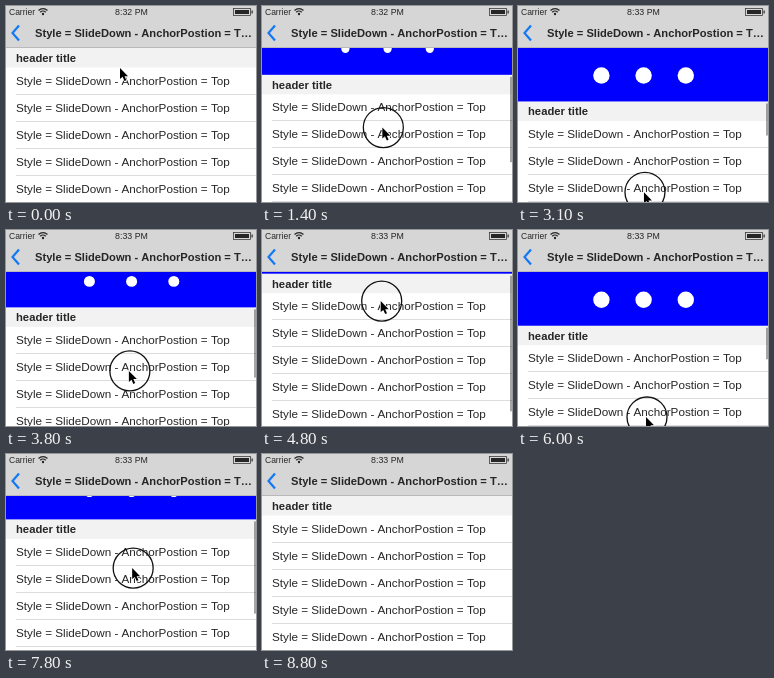
Recreate the animation shown at these times as an HTML page with a canvas. Size 250 px wide and 196 px high, loop 8.9 s.

```html
<!DOCTYPE html>
<html lang="en">
<head>
<meta charset="utf-8">
<title>Pull-down menu</title>
<style>
  html, body { margin: 0; width: 100%; height: 100%; overflow: hidden; background: #fff; }
  canvas { display: block; width: 250px; height: 196px; }
</style>
</head>
<body>
<canvas id="stage" width="250" height="196"></canvas>
<script>
const ctx = document.getElementById('stage').getContext('2d');
const LOOP = 8900, STEP = 100;
const NAV = 42, LIST = 61.5, ROW = 27;
const PRESS = 900, RELEASE = 8300, LEAVE = 8500;
const INK = '#262626';
const FAMILY = '"Liberation Sans", Arial, sans-serif';
const LABEL = 'Style = SlideDown - AnchorPostion = ';
const ARROW = new Path2D('M0 0V11L2.6 8.8L4.5 13L6.3 12.2L4.5 8.2H8Z');

const linear = p => p;
const speedUp = p => p * p;
const slowDown = p => 1 - (1 - p) ** 1.5;

// Each move glides from the end of the previous one.
const start = { until: 0, x: 115, y: 62 };
const moves = [
  { until: 450, x: 64, y: 160, ease: linear },
  { until: PRESS, x: 116, y: 60, ease: linear },
  { until: 2300, x: 127, y: 187, ease: slowDown },
  { until: 3000, x: 127, y: 187, ease: linear },
  { until: 4500, x: 116, y: 25, ease: speedUp },
  { until: 6000, x: 129, y: 187, ease: slowDown },
  { until: RELEASE, x: 126, y: 68, ease: speedUp }
];

function pointerAt(t) {
  let from = start;
  for (const to of moves) {
    if (t < to.until) {
      const p = to.ease((t - from.until) / (to.until - from.until));
      return { x: from.x + (to.x - from.x) * p, y: from.y + (to.y - from.y) * p };
    }
    from = to;
  }
  return from;
}

// The list follows upward drags directly and resists downward ones.
function pullAt(t, y) {
  if (t <= PRESS || t >= RELEASE) return 0;
  const drag = y - 68, range = 300;
  return drag < 0 ? drag : range * (1 - 1 / (1 + drag * 0.55 / range));
}

function rect(x, y, w, h, color) {
  ctx.fillStyle = color;
  ctx.fillRect(x, y, w, h);
}

function text(string, x, y, size, weight = 'normal', align = 'left') {
  ctx.font = `${weight} ${size}px ${FAMILY}`;
  ctx.textAlign = align;
  ctx.fillStyle = INK;
  ctx.fillText(string, x, y);
}

function disc(x, y, r, color) {
  ctx.beginPath();
  ctx.arc(x, y, r, 0, Math.PI * 2);
  ctx.fillStyle = color;
  ctx.fill();
}

function arc(x, y, r, from, to, color, width) {
  ctx.beginPath();
  ctx.arc(x, y, r, from, to);
  ctx.strokeStyle = color;
  ctx.lineWidth = width;
  ctx.stroke();
}

function drawList(pull) {
  for (let top = LIST + pull; top < 196; top += ROW) {
    text(LABEL + 'Top', 10, top + 17, 11.7);
    rect(10, Math.round(top + ROW - 1), 240, 1, '#dcdcde');
  }
  const headerTop = NAV + Math.max(0, pull);
  rect(0, headerTop, 250, 19.5, '#f2f2f2');
  text('header title', 10, headerTop + 14, 11.25, 'bold');
}

function drawMenu(pull) {
  if (pull <= 0) return;
  rect(0, NAV, 250, pull, '#00f');
  for (let i = -1; i <= 1; i++) {
    disc(125.6 + i * 42.2, 16 + pull, Math.min(8.2, pull * 0.155), '#fff');
  }
}

function drawScrollMark(t, pull) {
  if (t <= PRESS || t >= LEAVE) return;
  const inset = Math.max(0, pull);
  rect(248, 44 + inset, 2, 139 - 2 * inset, 'rgba(0, 0, 0, 0.35)');
}

function drawBars(t) {
  rect(0, 0, 250, NAV, '#d6d6d7');
  rect(0, NAV - 1, 250, 1, '#b8b8ba');
  text('Carrier', 3, 9, 8.5);
  text(t < 2500 ? '8:32 PM' : '8:33 PM', 125.5, 9, 8.8, 'normal', 'center');

  for (const r of [3.9, 6.3]) arc(37, 9, r, -Math.PI * 0.75, -Math.PI * 0.25, INK, 1.2);
  disc(37, 8, 1.2, INK);

  ctx.lineWidth = 0.7;
  ctx.strokeRect(227.5, 2.5, 17, 7);
  rect(229, 4, 14, 4, INK);
  rect(245.5, 4.5, 1.2, 3, INK);

  ctx.strokeStyle = '#1478f5';
  ctx.lineWidth = 2.2;
  ctx.stroke(new Path2D('M13 19.5L6.5 27L13 34.5'));
  text(LABEL + 'T…', 29, 31, 11.17, 'bold');
}

function drawPointer(t, { x, y }) {
  if (t >= LEAVE) return;
  if (t >= PRESS && t < RELEASE) arc(x, y, 20, 0, Math.PI * 2, '#111', 1.3);
  ctx.save();
  ctx.translate(x - 1, y);
  ctx.strokeStyle = '#fff';
  ctx.lineWidth = 1.4;
  ctx.stroke(ARROW);
  ctx.fillStyle = '#000';
  ctx.fill(ARROW);
  ctx.restore();
}

function draw() {
  const t = Math.floor(performance.now() % LOOP / STEP) * STEP;
  const pointer = pointerAt(t);
  const pull = pullAt(t, pointer.y);
  rect(0, 0, 250, 196, '#fff');
  drawList(pull);
  drawMenu(pull);
  drawScrollMark(t, pull);
  drawBars(t);
  drawPointer(t, pointer);
  requestAnimationFrame(draw);
}
draw();
</script>
</body>
</html>
```
